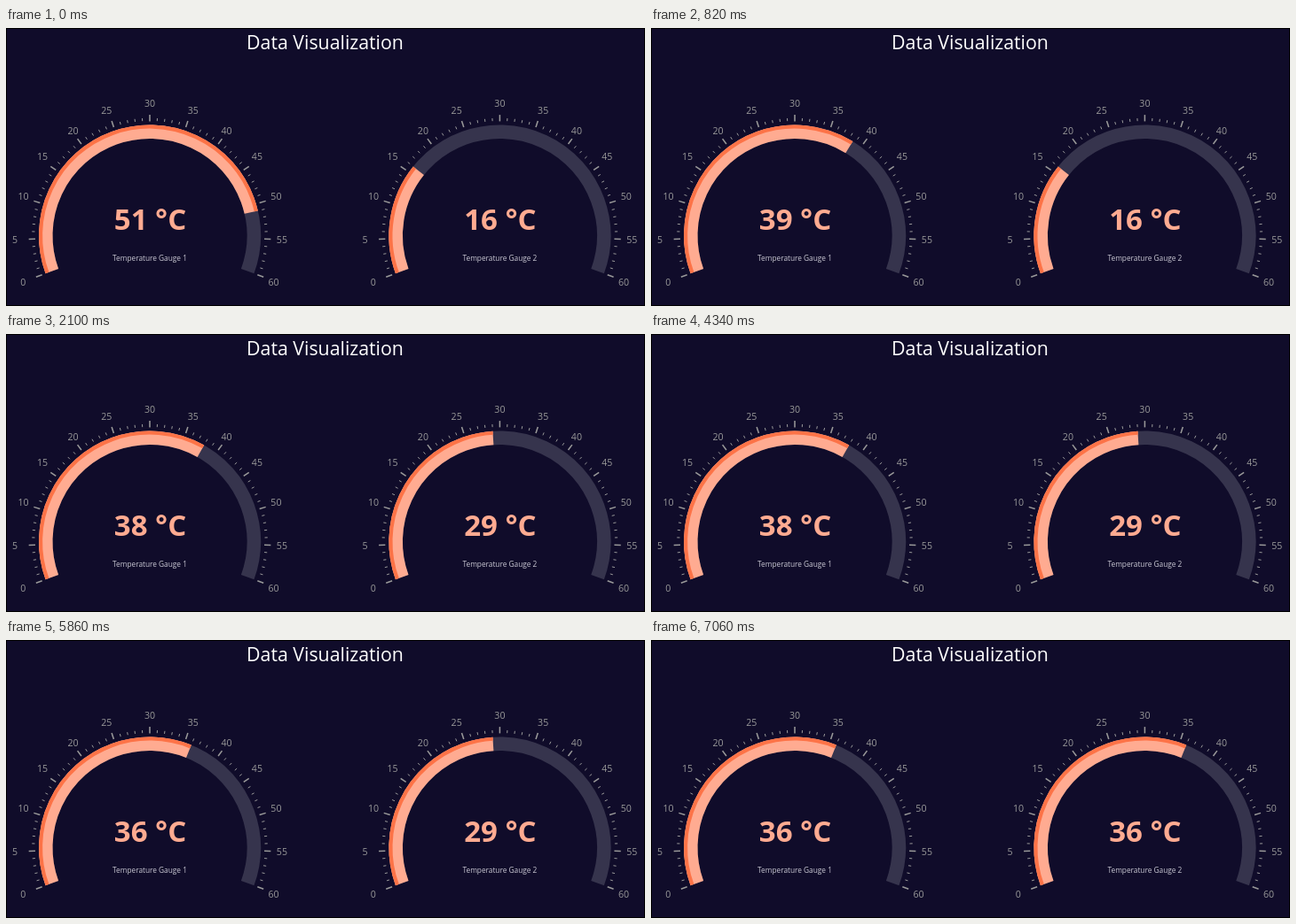
These frames come from a looping animation (720 by 314 pixels, 8 s). An HTML page with a canvas:

```html
<!DOCTYPE html>
<html lang="en">
<head>
<meta charset="utf-8">
<title>Data Visualization</title>
<style>
  html, body { margin: 0; width: 100%; height: 100%; overflow: hidden; background: #100c2a; }
  canvas { display: block; }
</style>
</head>
<body>
<canvas id="stage" width="720" height="314"></canvas>
<script>
const ctx = document.getElementById('stage').getContext('2d');
const LOOP = 8000, STEP = 80, OFFSET = 20, EASE_TIME = 500;
const MAX = 60, RADIUS = 125, BAND = 15.5, RIM = 4.1, LABEL_R = 155;
const FONT = '"Open Sans", "Noto Sans", sans-serif';

const gauges = [
  { x: 162, y: 234.5, name: 'Temperature Gauge 1', start: 51,
    moves: [{ at: 433, to: 38 }, { at: 4300, to: 36 }] },
  { x: 556.4, y: 234.5, name: 'Temperature Gauge 2', start: 16,
    moves: [{ at: 1420, to: 29 }, { at: 6160, to: 36 }] }
];

const cubicInOut = p => p < 0.5 ? 4 * p ** 3 : 1 - 4 * (1 - p) ** 3;

// Canvas angle of a value: the dial runs 220 degrees clockwise from lower left.
const angleOf = v => (160 + 220 * v / MAX) * Math.PI / 180;

function valueAt(gauge, t) {
  return gauge.moves.reduce((v, { at, to }) => {
    const p = Math.min(1, Math.max(0, (t - at) / EASE_TIME));
    return v + (to - v) * cubicInOut(p);
  }, gauge.start);
}

function text(str, x, y, size, color, weight = 400, align = 'center') {
  ctx.font = `${weight} ${size}px ${FONT}`;
  ctx.fillStyle = color;
  ctx.textAlign = align;
  ctx.fillText(str, x, y);
}

function band(from, to, width, color) {
  ctx.beginPath();
  ctx.arc(0, 0, RADIUS - width / 2, angleOf(from), angleOf(to));
  ctx.lineWidth = width;
  ctx.strokeStyle = color;
  ctx.stroke();
}

function tick(v, inner, outer, width) {
  const c = Math.cos(angleOf(v)), s = Math.sin(angleOf(v));
  ctx.beginPath();
  ctx.moveTo(inner * c, inner * s);
  ctx.lineTo(outer * c, outer * s);
  ctx.lineWidth = width;
  ctx.strokeStyle = '#999';
  ctx.stroke();
}

function label(v) {
  const c = Math.cos(angleOf(v)), s = Math.sin(angleOf(v));
  const align = c < -0.4 ? 'left' : c > 0.4 ? 'right' : 'center';
  const drop = s < -0.8 ? 5.7 : 0;
  text(v, LABEL_R * c, LABEL_R * s + drop + 3.8, 10.6, '#999', 400, align);
}

function drawGauge(gauge, t) {
  const value = valueAt(gauge, t);
  ctx.save();
  ctx.translate(gauge.x, gauge.y);
  band(0, MAX, BAND, '#36344d');
  band(0, value, BAND, '#ffab91');
  band(0, value, RIM, '#fd7347');
  for (let v = 0; v <= MAX; v++) {
    if (v % 5) {
      tick(v, 129.6, 132.8, 1);
    } else {
      tick(v, 129.1, 136.4, 1.55);
      label(v);
    }
  }
  text(`${Math.round(value)} °C`, 0.5, -6.5, 33, '#ffab91', 700);
  text(gauge.name, 0, 28.2, 8.3, '#c9c8d3');
  ctx.restore();
}

function draw(t) {
  ctx.fillStyle = '#100c2a';
  ctx.fillRect(0, 0, 720, 314);
  ctx.lineWidth = 1;
  ctx.strokeStyle = '#000';
  ctx.strokeRect(0.5, 0.5, 719, 313);
  text('Data Visualization', 359.5, 24, 21.3, '#fff');
  gauges.forEach(g => drawGauge(g, t));
}

function frame() {
  const t = performance.now() % LOOP;
  draw(Math.floor((t - OFFSET) / STEP) * STEP + OFFSET);
  requestAnimationFrame(frame);
}
frame();
</script>
</body>
</html>
```
